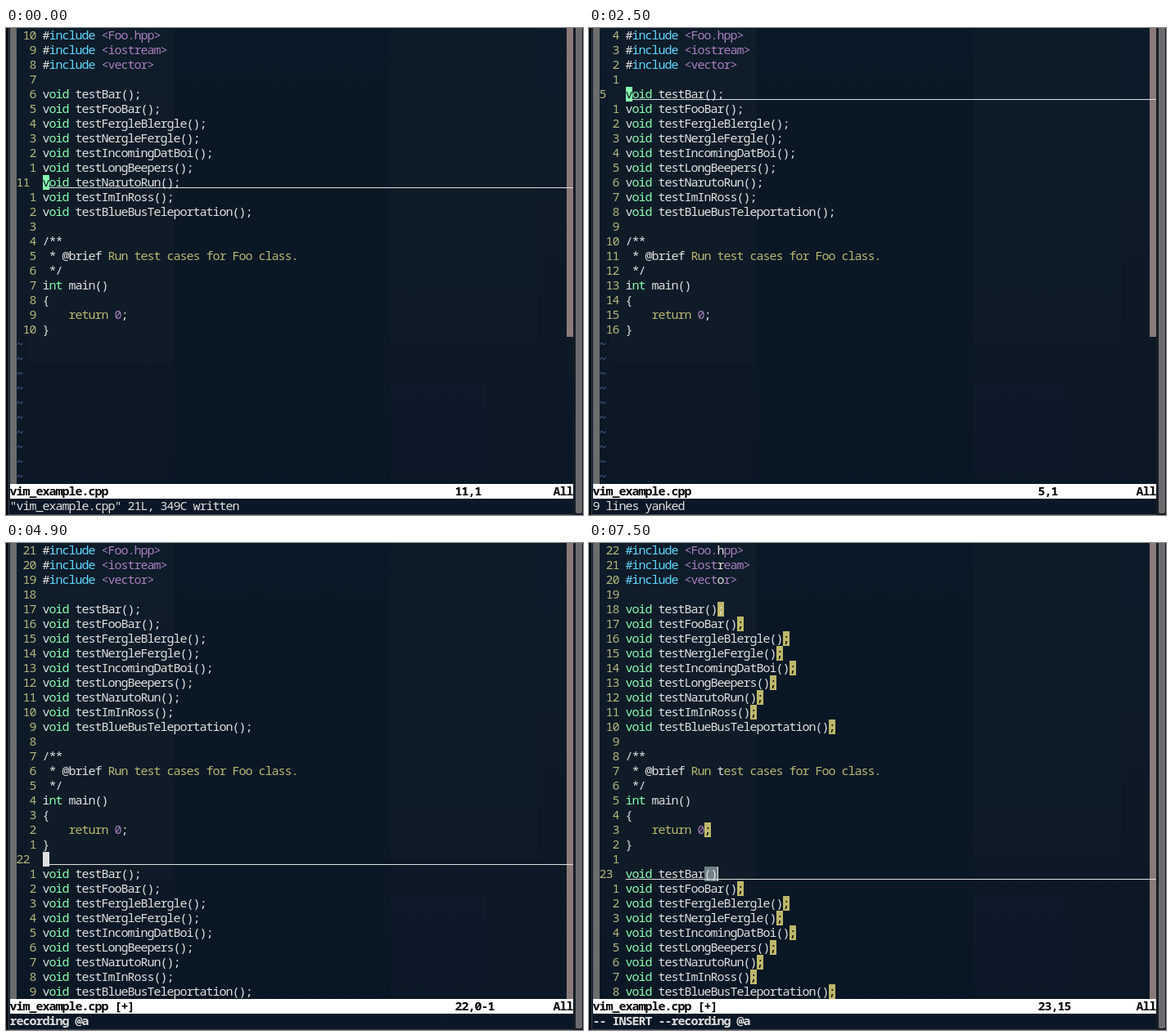
Animation, 705 px wide and 596 px high, one loop 8 s. Source, as an HTML page:

```html
<!DOCTYPE html>
<html lang="en">
<head>
<meta charset="utf-8">
<title>Editor session</title>
<style>
  html, body { margin: 0; width: 100%; height: 100%; overflow: hidden; background: #0c1724; }
  svg { display: block; width: 705px; height: 596px; }
  text { font: 15px "Noto Sans Mono", "DejaVu Sans Mono", monospace; letter-spacing: -1px; white-space: pre; }
  .bold { font-weight: 700; }
</style>
</head>
<body>
<svg viewBox="0 0 705 596" xmlns="http://www.w3.org/2000/svg">
  <defs>
    <linearGradient id="shade" x1="0" y1="0" x2="0" y2="1">
      <stop offset="0" stop-color="#0d1b2a"/>
      <stop offset="0.65" stop-color="#0d1925"/>
      <stop offset="1" stop-color="#0a1726"/>
    </linearGradient>
  </defs>
  <rect width="705" height="596" fill="url(#shade)"/>
  <rect x="26" width="179" height="410" fill="#13202a" opacity=".4"/>
  <rect x="205" width="265" height="558" fill="#081625" opacity=".5"/>
  <rect x="470" width="180" height="385" fill="#0f1e2b" opacity=".4"/>
  <rect x="470" y="432" width="116" height="110" fill="#102032" opacity=".2"/>
  <rect width="3" height="596" fill="#0a0f16"/>
  <rect x="3" width="1" height="596" fill="#3c434b"/>
  <rect x="3" y="595" width="692" height="1" fill="#3c434b"/>
  <rect x="5" width="8" height="558" fill="#6c6c6c"/>
  <rect x="693" width="12" height="596" fill="#171d25"/>
  <rect x="696" y="-6" width="8" height="600" rx="2" fill="#6b6b6d"/>
  <g id="screen"></g>
</svg>
<script>
const CW = 8, RH = 18, LEFT = 5, CODE = 45, RIGHT = 693, ROWS = 31, LOOP = 8000;
const C = {
  text: '#dfe1e0', bg: '#0c1724', green: '#87ffaf', cyan: '#5fd7ff', purple: '#a87fc0',
  khaki: '#b9b772', num: '#b2b67c', tilde: '#4d6296', select: '#6c6c6c',
  found: '#bdb76b', match: '#708088', margin: '#8a7a78', white: '#ffffff', black: '#000000'
};

const tests = ['Bar', 'FooBar', 'FergleBlergle', 'NergleFergle', 'IncomingDatBoi', 'LongBeepers',
  'NarutoRun', 'ImInRoss', 'BlueBusTeleportation'].map(n => `void test${n}();`);
const base = ['#include <Foo.hpp>', '#include <iostream>', '#include <vector>', '', ...tests, '',
  '/**', ' * @brief Run test cases for Foo class.', ' */', 'int main()', '{', '    return 0;', '}'];
const pasted = [...base, ...tests];
const spaced = [...base, '', ...tests];
const trimmed = spaced.map((s, i) => i === 22 ? s.slice(0, -1) : s);

// Each step changes only the listed parts of the editor state.
const steps = [
  [0, { lines: base, line: 11, col: 0, cursor: 'block', cmd: '', keys: '', visual: 0, search: false,
        pairs: [], file: 'vim_example.cpp', msg: '"vim_example.cpp" 21L, 349C written', bold: false }],
  [700, { keys: '6' }],
  [1000, { line: 5, keys: '' }],
  [1200, { visual: 5, keys: '1', msg: '-- VISUAL LINE --', bold: true }],
  [1700, { keys: '8' }],
  [2000, { keys: '8j' }],
  [2200, { line: 13, keys: '9' }],
  [2500, { line: 5, visual: 0, keys: '', msg: '9 lines yanked', bold: false }],
  [2800, { line: 21, pairs: [[19, 0], [21, 0]] }],
  [3200, { lines: pasted, line: 22, pairs: [], file: 'vim_example.cpp [+]', msg: '9 more lines' }],
  [3500, { cursor: 'bar', msg: '-- INSERT --', bold: true }],
  [3900, { lines: spaced, line: 23 }],
  [4000, { cursor: 'block', msg: '' }],
  [4300, { line: 22 }],
  [4600, { keys: 'q' }],
  [4900, { keys: '', msg: 'recording @a' }],
  [5700, { cursor: 'none', cmd: '/', msg: '/', bold: false }],
  [6500, { line: 23, col: 14, cursor: 'block', cmd: '/;', msg: '/;' }],
  [6800, { cmd: '', search: true, msg: 'recording @a', bold: true }],
  [7200, { col: 15, cursor: 'bar', msg: '-- INSERT --recording @a' }],
  [7500, { lines: trimmed, col: 14, pairs: [[23, 12], [23, 13]] }]
];
const states = [];
for (const [at, patch] of steps) states.push({ ...states.at(-1), ...patch, at });

const escapeText = s => s.replace(/&/g, '&amp;').replace(/</g, '&lt;').replace(/>/g, '&gt;');
const rect = (x, y, w, h, fill) => `<rect x="${x}" y="${y}" width="${w}" height="${h}" fill="${fill}"/>`;
// The half pixel centres the tightly tracked glyphs in their cells.
const text = (x, row, s, fill, bold) => s.trim()
  ? `<text x="${x - 0.5}" y="${row * RH + 14}" fill="${fill}"${bold ? ' class="bold"' : ''}>${escapeText(s)}</text>` : '';

const syntax = [
  [/#include/g, C.cyan], [/<[\w.]+>/g, C.purple], [/\b(void|int)\b/g, C.green],
  [/\breturn\b/g, C.khaki], [/\b\d+/g, C.purple], [/Run test.*/g, C.khaki]
];

function cellsOf(s) {
  const cells = [...s].map(ch => ({ ch, fg: C.text, bg: '' }));
  for (const [re, fg] of syntax)
    for (const m of s.matchAll(re))
      for (let i = 0; i < m[0].length; i++) cells[m.index + i].fg = fg;
  return cells;
}

function drawLine(st, i) {
  const n = i + 1, top = i * RH, here = n === st.line;
  const cells = cellsOf(st.lines[i]);
  const selected = st.visual && n >= st.visual && n <= st.line;
  for (const c of cells) {
    if (selected) c.bg = C.select;
    if (st.search && c.ch === ';') { c.bg = C.found; c.fg = C.black; }
  }
  for (const [l, c] of st.pairs) if (l === n) cells[c].bg = C.match;
  if (!here && cells[st.col]) cells[st.col].fg = C.text;

  const block = here && st.cursor === 'block';
  if (block) {
    const c = cells[st.col] || (cells[st.col] = { ch: ' ', fg: C.text, bg: '' });
    const back = c.bg || C.bg;
    c.bg = c.fg;
    c.fg = back;
  }

  let out = rect(685, top, CW, RH, C.margin);
  out += text(13, i, here ? String(n) : String(Math.abs(n - st.line)).padStart(3), C.num);
  let glyphs = '';
  for (let a = 0, b; a < cells.length; a = b) {
    const { fg, bg } = cells[a];
    for (b = a; b < cells.length && cells[b].fg === fg && cells[b].bg === bg;) b++;
    const x = CODE + a * CW;
    if (bg) out += rect(x, top, (b - a) * CW, RH, bg);
    glyphs += text(x, i, cells.slice(a, b).map(c => c.ch).join(''), fg);
  }
  out += glyphs;
  const x = CODE + st.col * CW;
  if (here && !st.visual) {
    const cut = block ? x : RIGHT;
    out += rect(CODE, top + 15, cut - CODE, 1, C.text);
    if (block) out += rect(x + CW, top + 15, RIGHT - x - CW, 1, C.text);
  }
  if (here && st.cursor === 'bar') out += rect(x, top, 1, RH, C.text);
  return out;
}

function draw(st) {
  let out = '';
  for (let i = 0; i < ROWS; i++)
    out += i < st.lines.length ? drawLine(st, i) : text(13, i, '~', C.tilde);

  const pos = st.lines[st.line - 1] ? st.col + 1 : '0-1';
  out += rect(LEFT, ROWS * RH, RIGHT - LEFT, RH, C.white);
  out += text(LEFT, ROWS, st.file, C.black, true);
  out += text(549, ROWS, `${st.line},${pos}`, C.black, true);
  out += text(669, ROWS, 'All', C.black, true);

  out += text(LEFT, ROWS + 1, st.msg, C.text, st.bold);
  out += text(605, ROWS + 1, st.keys, C.text);
  if (st.cmd) out += rect(LEFT + st.cmd.length * CW, (ROWS + 1) * RH, CW, RH, C.text);
  return out;
}

const screenEl = document.getElementById('screen');
const start = performance.now();
let shown = null;

function tick() {
  const t = (performance.now() - start) % LOOP;
  const st = states.findLast(s => s.at <= t);
  if (st !== shown) {
    screenEl.innerHTML = draw(st);
    shown = st;
  }
  requestAnimationFrame(tick);
}
tick();
</script>
</body>
</html>
```
